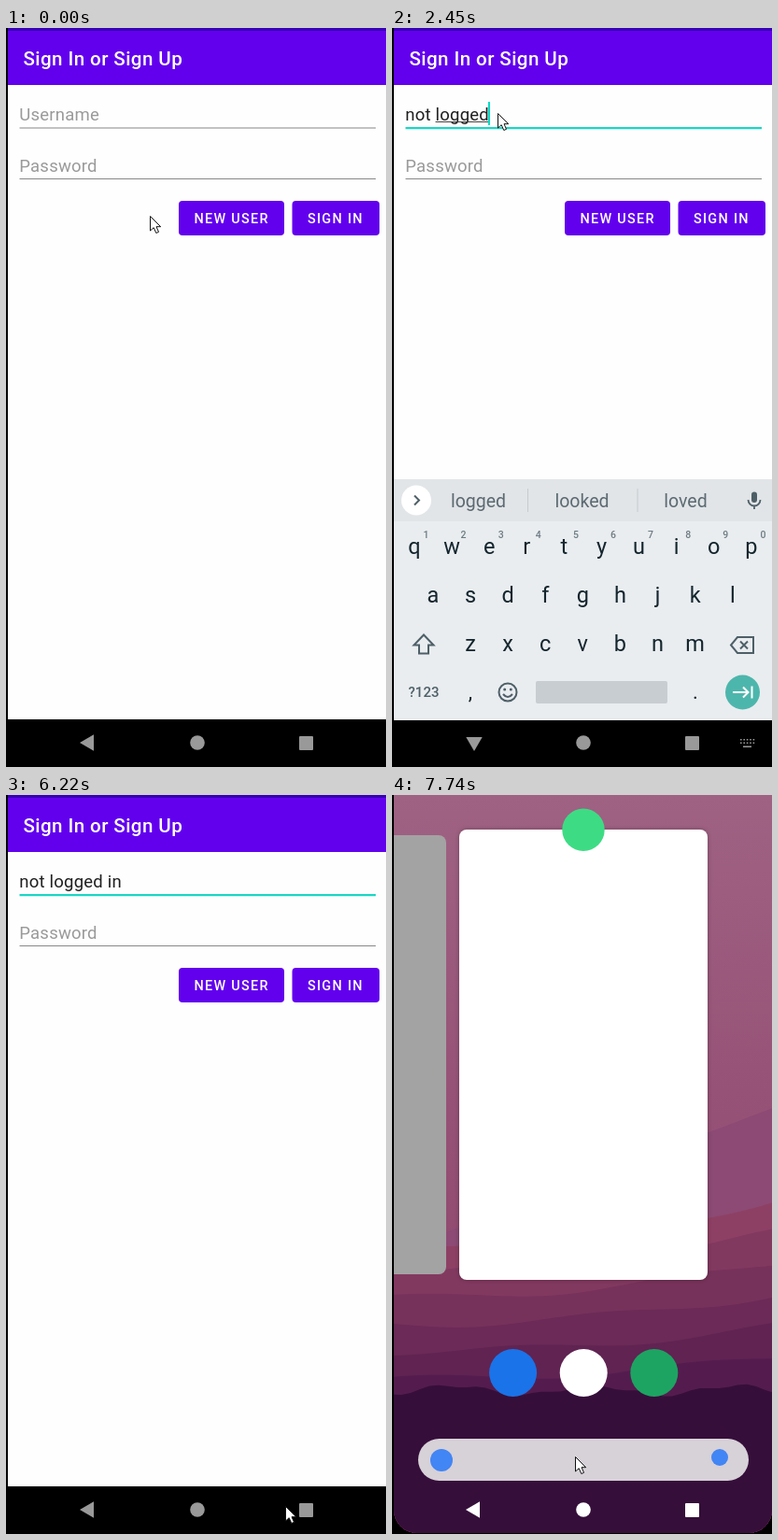
An HTML page with a canvas for the animation above (7.99 s loop, 407 by 791 pixels).

```html
<!DOCTYPE html>
<html lang="en">
<head>
<meta charset="utf-8">
<title>Sign In or Sign Up</title>
<style>
html, body { margin: 0; width: 100%; height: 100%; overflow: hidden; background: #000; }
canvas { display: block; }
</style>
</head>
<body>
<canvas id="stage" width="407" height="791"></canvas>
<script>
const screen2d = document.getElementById('stage').getContext('2d');
const layer = new OffscreenCanvas(407, 791);
const layer2d = layer.getContext('2d');
let c = screen2d;

const LOOP = 7990;
const PHRASE = 'not logged in';
const GUESSES = { n: 'not now note', l: 'logged looked loved', i: 'in is it' };

// Pointer path: [time, x, y]
const path = [
  [0, 154, 202], [120, 129, 115], [410, 115, 74], [710, 113, 91],
  [3820, 113, 91], [4180, 200, 282], [4700, 200, 282], [4930, 287, 515],
  [5310, 289, 658], [5430, 276, 708], [5700, 299, 761], [6340, 299, 761],
  [6470, 295, 717], [6590, 299, 574], [7200, 280, 90], [7440, 285, 518],
  [7590, 300, 592], [7740, 196, 708], [LOOP, 196, 708]
];

const clamp = v => Math.max(0, Math.min(1, v));
const span = (t, a, b) => clamp((t - a) / (b - a));
const lerp = (a, b, u) => a + (b - a) * u;
const smooth = u => u * u * (3 - 2 * u);

function box(x, y, w, h, color, r = 0) {
  c.fillStyle = color;
  c.beginPath();
  c.roundRect(x, y, w, h, r);
  c.fill();
}
function disc(x, y, r, color) {
  c.fillStyle = color;
  c.beginPath();
  c.arc(x, y, r, 0, 7);
  c.fill();
}
function shape(d, color) {
  c.fillStyle = color;
  c.fill(new Path2D(d));
}
function stroke(d, color, w = 2) {
  c.strokeStyle = color;
  c.lineWidth = w;
  c.stroke(new Path2D(d));
}
function text(s, x, y, size, color, { weight = 400, gap = 0, align = 'left' } = {}) {
  c.font = `${weight} ${size}px Roboto, sans-serif`;
  c.letterSpacing = gap + 'px';
  c.textAlign = align;
  c.fillStyle = color;
  c.fillText(s, x, y);
}

const typedAt = t => PHRASE.slice(0, Math.max(0, Math.floor((t - 1630) / 90) + 1));
const lastWord = s => s.slice(s.lastIndexOf(' ') + 1);

function caretOn(t) {
  if (t < 1130 || t > 5900) return false;
  return t < 2900 || Math.floor((t - 3445) / 495) % 2 === 0;
}

function signIn(t) {
  const field = (s, y, color) => text(s, 14.3, y, 18.54, color, { gap: 0.2 });
  const button = (s, x, w) => {
    box(x, 185, w, 37, '#6200ee', 4);
    text(s, x + 16.5, 209, 14.43, '#fff', { weight: 500, gap: 1.29 });
  };
  box(2, -25, 405, 28, '#3700b3');
  box(2, 3, 405, 58, '#6200ee');
  box(2, 61, 405, 679, '#fefefe');
  box(2, 740, 405, 60, '#000');
  text('Sign In or Sign Up', 18.5, 40, 20.6, '#fff', { weight: 500, gap: 0.4 });

  const typed = typedAt(t), word = lastWord(typed);
  if (t < 990) box(14.5, 106.5, 381.5, 1, '#888');
  else box(14.5, 106, 381.5, 2.2, '#1bd6c5');
  field(typed || 'Username', 99, typed ? '#202020' : '#9a9a9a');
  const end = 14.3 + c.measureText(typed).width;
  const wide = c.measureText(word).width;
  if (t < 3450) box(end - wide, 100, wide, 1, '#444');
  if (caretOn(t)) box(Math.round(end - 0.6), 79, 2, 25, '#03dac5');

  field('Password', 154, '#9a9a9a');
  box(14.5, 161, 381.5, 1, '#888');
  button('NEW USER', 185, 113);
  button('SIGN IN', 306.5, 93.5);
}

function keys(t) {
  const ink = '#14252d', soft = '#4e5f67', mid = { align: 'center' };
  const bold = { weight: 500, align: 'center' };
  const row = (s, x, y, size = 23.5, color = ink, style = mid) =>
    [...s].forEach((k, i) => text(k, x + 40.1 * i, y, size, color, style));

  box(2, 483, 405, 258, '#e9edf0');
  const guesses = t < 3450 && GUESSES[lastWord(typedAt(t))[0]];
  if (guesses) {
    box(2, 483, 405, 45, '#e1e5e8');
    guesses.split(' ').forEach((w, i) => text(w, 92.5 + 111 * i, 513, 19.5, '#5c6a71', mid));
    box(145, 493, 1, 25, '#c6cbcf');
    box(262.5, 493, 1, 25, '#c6cbcf');
  }
  disc(26, 505.5, 16, '#fff');
  stroke('M24 500.5l5 5-5 5', soft);
  box(385, 496.5, 6, 11.5, soft, 3);
  stroke('M381.5 505a6.5 6.5 0 0 0 13 0M388 511v4', soft, 1.8);

  row('qwertyuiop', 24, 563);
  row('asdfghjkl', 44, 615);
  row('zxcvbnm', 84, 667);
  row('1234567890', 36.5, 546, 10.5, '#6d7b82', bold);
  stroke('M34 649.5L44.5 660.5H39V669.5H29V660.5H23.5Z', soft);
  stroke('M370 652H387V669H370L363 660.5ZM373 656.5l8 8m0-8l-8 8', soft);

  text('?123', 34, 716, 15, soft, bold);
  text(',', 84, 718, 22, ink, mid);
  text('.', 325, 718, 22, ink, mid);
  stroke('M133.5 711a9.5 9.5 0 1 1-19 0a9.5 9.5 0 1 1 19 0M119 713q5 6 10 0', soft);
  disc(120.7, 708, 1.5, soft);
  disc(127.3, 708, 1.5, soft);
  box(154, 699, 141, 24, '#c8cdd1', 2);
  disc(375.5, 711, 18.5, '#4db6ac');
  stroke('M365 711h16M376 705.5l5.5 5.5-5.5 5.5M385.5 704.5v13', '#fff');
}

// The keyboard fades as one sheet, so it is drawn on its own layer first
function keyboard(t) {
  const shown = Math.min(span(t, 1430, 1580), 1 - span(t, 3480, 3660));
  if (!shown) return;
  c = layer2d;
  c.clearRect(0, 0, 407, 791);
  keys(t);
  c = screen2d;
  c.globalAlpha = shown;
  c.drawImage(layer, 0, 56 * (1 - shown));
  c.globalAlpha = 1;
}

function ridge(color, height) {
  c.fillStyle = color;
  c.beginPath();
  c.moveTo(0, 791);
  for (let x = 0; x <= 410; x += 10) c.lineTo(x, height(x));
  c.lineTo(410, 791);
  c.fill();
}

function home() {
  const sky = c.createLinearGradient(0, 0, 0, 500);
  sky.addColorStop(0, '#9f6283');
  sky.addColorStop(1, '#924a70');
  box(0, 0, 407, 791, sky);
  ridge('#8c4a74', x => 490 - 0.38 * x);
  for (let i = 0; i < 6; i++) {
    const u = i / 5;
    const rgb = [lerp(142, 84, u), lerp(64, 28, u), lerp(100, 78, u)];
    ridge(`rgb(${rgb})`, x => 480 + 29 * i - (x / 407) ** 2 * 45 * (1 - u / 2) + 4 * Math.sin(x / 45 + 2 * i));
  }
  ridge('#360e3a', x => 637 + 5 * Math.sin(x / 24 + 2) + 2 * Math.sin(x / 9));

  ['#1a73e8', '#fff', '#1da462'].forEach((color, i) => disc(129.6 + 75.6 * i, 618.5, 25.5, color));
  box(28, 689, 354, 45, '#d7d1d8', 22.5);
  disc(53, 712, 12, '#4285f4');
  disc(351, 709, 9, '#4285f4');
}

// A blank card, from the dimmed place at the left (0) to the centre (1)
function blankCard(u, shift = 0) {
  const g = Math.round(lerp(163, 255, u));
  box(lerp(-201, 72, u) + shift, lerp(43, 37, u), lerp(259, 266, u), lerp(470, 482, u),
    `rgb(${g},${g},${g})`, 8);
}

function badge(alpha, y) {
  c.globalAlpha = alpha;
  disc(205, y, 22.7, '#3ddc84');
  c.globalAlpha = 1;
}

function appCard(t, p, lift) {
  const top = lerp(-21, 3, p), height = lerp(791, 737, p) - top, scale = 1 - 0.343 * p;
  c.save();
  c.translate(2 + 70 * p, 35 * p - lift);
  c.scale(scale, scale);
  c.translate(-2, 0);
  c.beginPath();
  c.roundRect(2, top, 405, height, 12 * p);
  c.clip();
  signIn(t);
  c.restore();
  badge(span(t, 6600, 6830), 37.3 - lift);
}

function overview(t) {
  const next = smooth(span(t, 7120, 7440));
  home();
  blankCard(0, 273 * (next - 1));
  c.save();
  c.shadowColor = 'rgba(0,0,0,.3)';
  c.shadowBlur = 5 * next;
  blankCard(next);
  c.restore();
  appCard(t, smooth(span(t, 6255, 6595)), 700 * span(t, 7020, 7320) ** 1.5);
  badge(next, 37.3);
}

function navBar(t) {
  const color = t > 6255 ? '#fff' : '#999';
  const turn = span(t, 1170, 1410) - span(t, 3430, 3590);
  c.save();
  c.translate(88, 765);
  c.rotate(-turn * Math.PI / 2);
  shape('M-9 0L6-8.7V8.7Z', color);
  c.restore();
  disc(205, 765, 7.8, color);
  box(314, 758, 15, 15, color, 1);
  if (t >= 1370 && t < 3450) {
    for (let i = 0; i < 10; i++)
      box(373 + i % 5 * 3.4, 761 + Math.floor(i / 5) * 3.5, 1.6, 1.6, color);
    box(376, 768.5, 9, 1.6, color);
  }
}

function pointer(t) {
  const i = path.findIndex(k => k[0] > t);
  const [a, x0, y0] = path[i - 1], [b, x1, y1] = path[i];
  const u = span(t, a, b);
  const arrow = 'M0 0V15.5L3.7 12.2L6.3 18L9 16.8L6.5 11.2H11.2Z';
  c.save();
  c.translate(Math.round(lerp(x0, x1, u)) + 0.5, Math.round(lerp(y0, y1, u)) + 0.5);
  shape(arrow, '#fff');
  stroke(arrow, '#111', 1);
  c.restore();
}

function draw(t) {
  box(0, 0, 407, 791, '#000');
  c.save();
  c.beginPath();
  c.roundRect(2, -40, 405, 830, 25);
  c.clip();
  if (t < 6255) {
    signIn(t);
    keyboard(t);
  } else overview(t);
  navBar(t);
  c.restore();
  pointer(t);
}

const begin = performance.now();
function frame() {
  draw((performance.now() - begin) % LOOP);
  requestAnimationFrame(frame);
}
frame();
</script>
</body>
</html>
```
